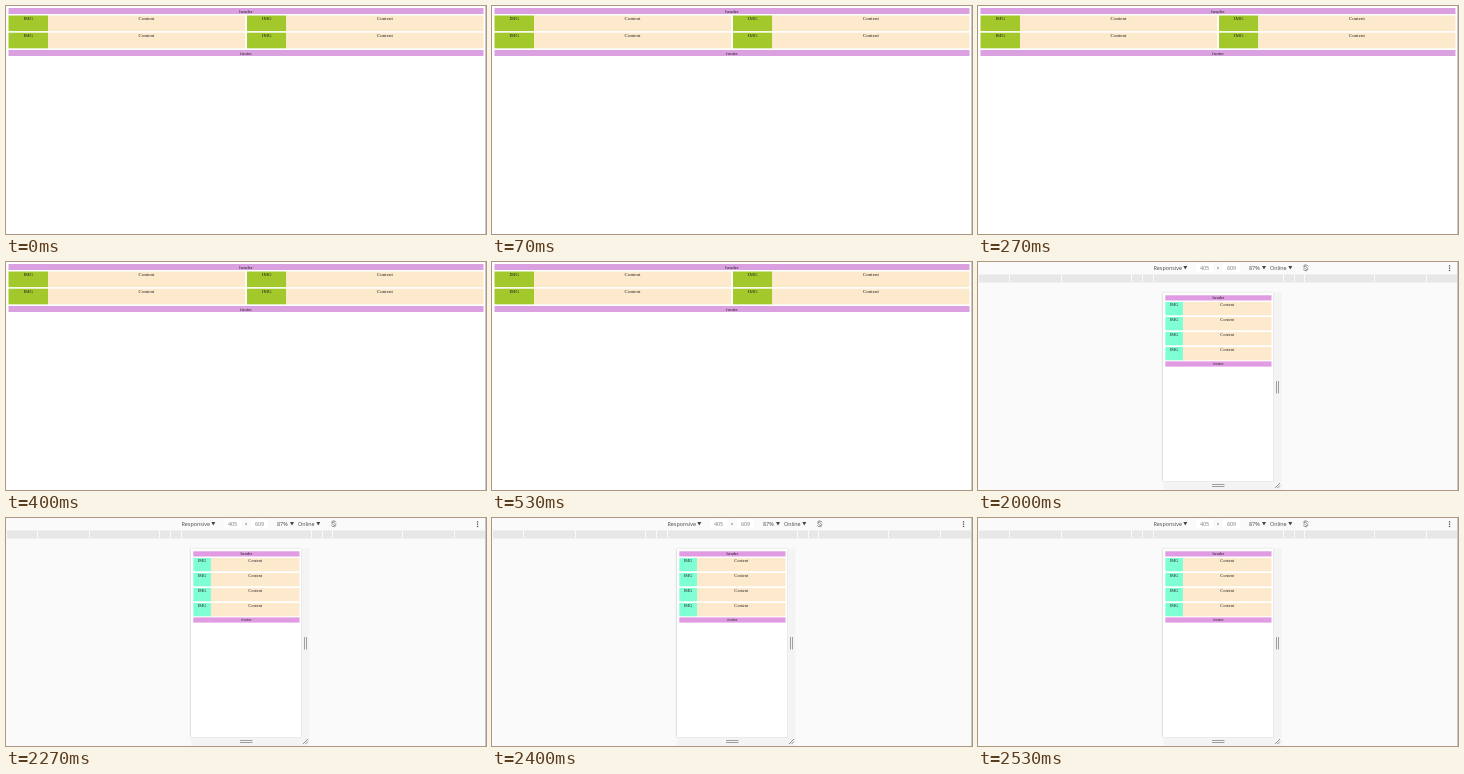
Write an HTML page with a canvas that moves like this. It is 480 px wide and 228 px high and loops after 2.99 s.

```html
<!DOCTYPE html>
<html lang="en">
<head>
<meta charset="utf-8">
<title>Responsive layout</title>
<style>
html, body { margin: 0; width: 100%; height: 100%; overflow: hidden; background: #fff; }
canvas { display: block; width: 480px; height: 228px; }
</style>
</head>
<body>
<canvas id="stage"></canvas>
<script>
const W = 480, H = 228, LOOP = 2990;
const SERIF = '"Liberation Serif", serif';
const SANS = '"Open Sans", sans-serif';
const canvas = document.getElementById('stage');
const ctx = canvas.getContext('2d');
const dpr = window.devicePixelRatio || 1;
canvas.width = W * dpr;
canvas.height = H * dpr;

function box(x1, y1, x2, y2, color) {
  ctx.fillStyle = color;
  ctx.fillRect(x1, y1, x2 - x1, y2 - y1);
}

function label(text, x, y, size, family, color, align = 'center') {
  ctx.font = `${size}px ${family}`;
  ctx.textAlign = align;
  ctx.fillStyle = color;
  ctx.fillText(text, x, y);
}

function line(x1, y1, x2, y2, color, width = 1) {
  ctx.strokeStyle = color;
  ctx.lineWidth = width;
  ctx.beginPath();
  ctx.moveTo(x1, y1);
  ctx.lineTo(x2, y2);
  ctx.stroke();
}

// Header, rows of image and content cells, footer
function page(p) {
  const mid = (p.left + p.right) / 2;
  const bar = (text, y) => {
    box(p.left, y, p.right, y + p.barH, p.bar);
    label(text, mid, y + p.barBase, p.font, SERIF, '#222');
  };
  bar('header', p.top);
  p.rows.forEach(y => p.cards.forEach(([x1, split, x2]) => {
    box(x1, y, split, y + p.rowH, p.img);
    box(split, y, x2, y + p.rowH, '#fde9cc');
    label('IMG', (x1 + split) / 2, y + p.rowBase, p.font, SERIF, '#222');
    label('Content', (split + x2) / 2, y + p.rowBase, p.font, SERIF, '#222');
  }));
  bar('footer', p.end);
}

const full = {
  left: 2.5, right: 477.5, top: 2, end: 44, barH: 6, barBase: 4.7,
  rows: [9.5, 26.7], rowH: 15.6, rowBase: 4.7, font: 5,
  cards: [[2.5, 42, 239], [241, 280.3, 477.5]],
  bar: '#dba0df', img: '#a3c82b'
};

const small = {
  top: 33.3, barH: 5.2, barBase: 3.9, rowH: 13.3, rowBase: 4,
  font: 4.4, bar: '#e09be2', img: '#7fffd4'
};

const wide = {
  ...small, left: 80.5, right: 400, end: 70, rows: [40, 55],
  cards: [[80.5, 107, 239], [241, 267.3, 400]],
  frame: [79, 402], size: '1188', sizeColor: '#444'
};

const narrow = {
  ...small, left: 187.3, right: 293.5, end: 99.4, rows: [40, 55, 70, 85],
  cards: [[187.3, 205, 293.5]],
  frame: [185, 295], size: '405', sizeColor: '#777'
};

function arrow(x) {
  ctx.fillStyle = '#444';
  ctx.beginPath();
  ctx.moveTo(x, 4);
  ctx.lineTo(x + 4, 4);
  ctx.lineTo(x + 2, 7.6);
  ctx.fill();
}

function toolbar(d) {
  const item = (text, x, color = '#444', align = 'left') =>
    label(text, x, 7.8, 5.4, SANS, color, align);
  box(0, 0, W, 12, '#fafafa');
  box(218, 1.5, 235, 10.5, '#fff');
  box(245, 1.5, 262, 10.5, '#fff');
  item('Responsive', 175.5);
  arrow(205.3);
  item(d.size, 226.5, d.sizeColor, 'center');
  item('×', 240, '#777', 'center');
  item('609', 253.5, '#777', 'center');
  item('87%', 271);
  arrow(284);
  item('Online', 292);
  arrow(310.3);

  // Rotate icon
  ctx.strokeStyle = '#666';
  ctx.lineWidth = 0.7;
  ctx.beginPath();
  ctx.arc(327.7, 5.8, 2.9, -2.6, -0.5);
  ctx.moveTo(330.3, 7.1);
  ctx.arc(327.7, 5.8, 2.9, 0.5, 2.6);
  ctx.stroke();
  ctx.save();
  ctx.translate(327.7, 5.8);
  ctx.rotate(-Math.PI / 4);
  ctx.strokeRect(-1, -1.8, 2, 3.6);
  ctx.restore();

  for (const y of [3.2, 5.5, 7.8]) box(470.9, y, 472.2, y + 1.3, '#555');
}

function ruler() {
  box(0, 12.5, W, 20.5, '#e7e7e7');
  for (const x of [0, 31, 83, 153, 164, 175, 305, 316, 326, 396, 448]) {
    box(x, 12.5, x + 1, 20.5, '#fafafa');
  }
}

function device(d) {
  const [x1, x2] = d.frame;
  box(0, 0, W, H, '#fafafa');
  toolbar(d);
  ruler();

  ctx.save();
  ctx.shadowColor = 'rgba(0,0,0,.3)';
  ctx.shadowBlur = 2 * dpr;
  box(x1, 30.5, x2, 219, '#fff');
  ctx.restore();

  // Resize handles
  box(x2 + 0.5, 30.5, x2 + 8.5, 219, '#f4f4f4');
  box(x1, 219.5, x2 + 8.5, H, '#f4f4f4');
  for (const dx of [3.5, 5.5]) line(x2 + dx, 119, x2 + dx, 131.5, '#888', 0.8);
  for (const y of [222.5, 224.5]) line(234, y, 246.5, y, '#888', 0.8);
  line(x2 + 2, 226, x2 + 7, 221, '#777', 0.8);
  line(x2 + 4.5, 226, x2 + 7, 223.5, '#777', 0.8);

  page(d);
}

function draw(t) {
  ctx.setTransform(dpr, 0, 0, dpr, 0, 0);
  box(0, 0, W, H, '#fff');
  if (t < 1000) page(full);
  else device(t < 2000 ? wide : narrow);
  box(479, 0, W, H, '#c8c8c8');
}

const start = performance.now();
function tick() {
  draw((performance.now() - start) % LOOP);
  requestAnimationFrame(tick);
}
tick();
</script>
</body>
</html>
```
